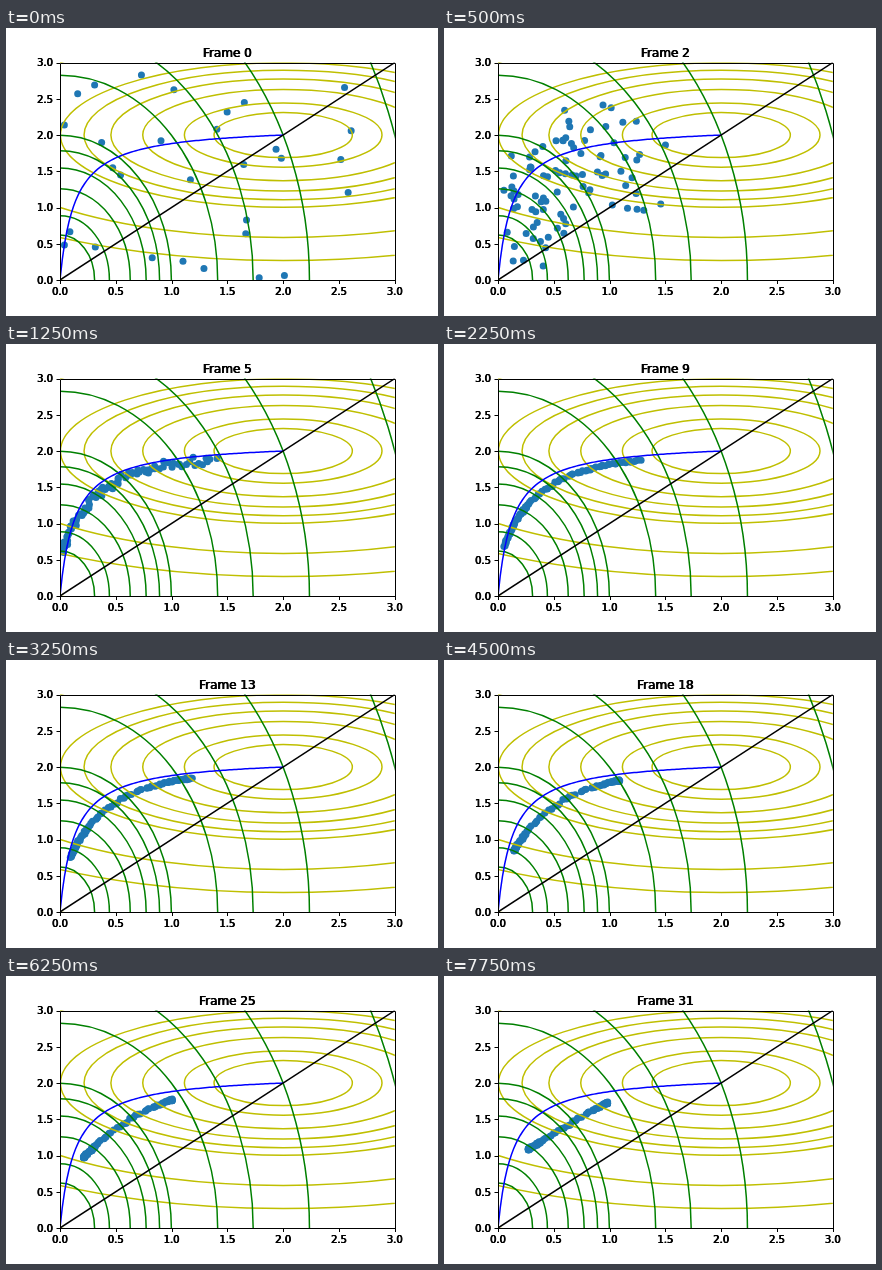
An HTML page with a canvas that plays this animation: 432x288 px, repeating every 8 s.

```html
<!DOCTYPE html>
<html lang="en">
<head>
<meta charset="utf-8">
<title>Converging population</title>
<style>
  html, body { margin: 0; width: 100%; height: 100%; overflow: hidden; background: #fff; }
  canvas { display: block; }
</style>
</head>
<body>
<canvas id="stage" width="432" height="288"></canvas>
<script>
const ctx = document.getElementById('stage').getContext('2d');
const STEP = 250, STEPS = 32, COUNT = 90;
const LEFT = 54, RIGHT = 388.8, TOP = 34.56, BOTTOM = 252;
const UNIT_X = (RIGHT - LEFT) / 3, UNIT_Y = (BOTTOM - TOP) / 3;
const LEVELS = [.1, .2, .4, .6, .8, 1, 2, 3, 5, 10];
const GRID_INSET = .004; // contours on a coarse grid lie slightly inside

// Bezier control points of the population's curve, first bent, then almost straight
const BENT = [[56, 208], [74, 146], [115, 121], [212, 114]];
const STRAIGHT = [[85, 173], [111, 157], [137, 140], [163, 127]];

const px = x => LEFT + x * UNIT_X;
const py = y => BOTTOM - y * UNIT_Y;
const mix = (a, b, t) => a + (b - a) * t;
const clamp = t => Math.min(1, Math.max(0, t));
const smooth = t => t * t * (3 - 2 * t);
const snap = v => Math.floor(v + .5) + .5;
const random = n => { const s = Math.sin(n * 12.9898 + 4.1) * 43758.5453; return s - Math.floor(s); };

function bezier(a, b, c, d, t) {
  const s = 1 - t;
  return s * s * s * a + 3 * s * s * t * b + 3 * s * t * t * c + t * t * t * d;
}

function curve(step, u) {
  const t = clamp((step - 5) / 26);
  const points = BENT.map(([x, y], i) => {
    const tx = i === 3 ? t * (2 - t) : t; // the right end slows down
    return [mix(x, STRAIGHT[i][0], tx), mix(y, STRAIGHT[i][1], t)];
  });
  return [0, 1].map(axis => bezier(...points.map(p => p[axis]), u));
}

// A wide scatter shrinks onto the curve, then gathers towards its two ends
function place(i, step) {
  const [r, jx, jy, wx, wy] = [0, 1, 2, 3, 4].map(k => random(i + 200 * k));
  const even = Math.pow((i + r) / COUNT, 1.15);
  const u = mix(even, smooth(smooth(even)), clamp((step - 7) / 12));
  const [x, y] = curve(step, u);
  const scatter = Math.exp(-.88 * step);
  return [
    mix(x + 2 * jx - 1, mix(54, 352, wx), scatter),
    mix(y + 2 * jy - 1, mix(-195, 515, wy), scatter)
  ];
}

function stroke(color, width, trace) {
  ctx.strokeStyle = color;
  ctx.lineWidth = width;
  ctx.beginPath();
  trace();
  ctx.stroke();
}

function contours(color, cx, cy, wx, wy) {
  for (const level of LEVELS) {
    const r = Math.sqrt(level - GRID_INSET);
    stroke(color, 1.5, () =>
      ctx.ellipse(px(cx), py(cy), r * wx * UNIT_X, r * wy * UNIT_Y, 0, 0, 2 * Math.PI));
  }
}

// Slightly shifted passes give the heavy glyph edges
function label(text, x, y, size, align) {
  ctx.font = size + 'px "DejaVu Sans", sans-serif';
  ctx.textAlign = align;
  ctx.fillStyle = '#000';
  for (const shift of [-.4, 0, .4]) ctx.fillText(text, x + shift, y);
}

function axes() {
  stroke('#000', 1, () => {
    const l = snap(LEFT), t = snap(TOP);
    ctx.rect(l, t, snap(RIGHT) - l, snap(BOTTOM) - t);
    for (let i = 0; i <= 6; i++) {
      const x = snap(px(i / 2)), y = snap(py(i / 2));
      ctx.moveTo(x, BOTTOM);
      ctx.lineTo(x, BOTTOM + 4);
      ctx.moveTo(LEFT, y);
      ctx.lineTo(LEFT - 3.5, y);
    }
  });
  for (let i = 0; i <= 6; i++) {
    const text = (i / 2).toFixed(1);
    label(text, px(i / 2), 267, 10, 'center');
    label(text, 47, py(i / 2) + 3.8, 10, 'right');
  }
}

function draw(step) {
  ctx.fillStyle = '#fff';
  ctx.fillRect(0, 0, 432, 288);

  ctx.save();
  ctx.beginPath();
  ctx.rect(LEFT, TOP, RIGHT - LEFT, BOTTOM - TOP);
  ctx.clip();
  ctx.fillStyle = '#1f77b4';
  for (let i = 0; i < COUNT; i++) {
    ctx.beginPath();
    ctx.arc(...place(i, step), 3.5, 0, 2 * Math.PI);
    ctx.fill();
  }
  contours('#bfbf00', 2, 2, 2, 1);
  contours('#008000', 0, 0, 1, 2);
  stroke('#00f', 1.5, () => {
    for (let x = 0; x <= 2.001; x += .02) ctx.lineTo(px(x), py(32 * x / (2 + 15 * x)));
  });
  stroke('#000', 1.5, () => {
    ctx.moveTo(px(0), py(0));
    ctx.lineTo(px(3), py(3));
  });
  ctx.restore();

  axes();
  label('Frame ' + step, (LEFT + RIGHT) / 2, 28.6, 12, 'center');
}

function tick() {
  draw(Math.floor(performance.now() / STEP) % STEPS);
  requestAnimationFrame(tick);
}
tick();
</script>
</body>
</html>
```
